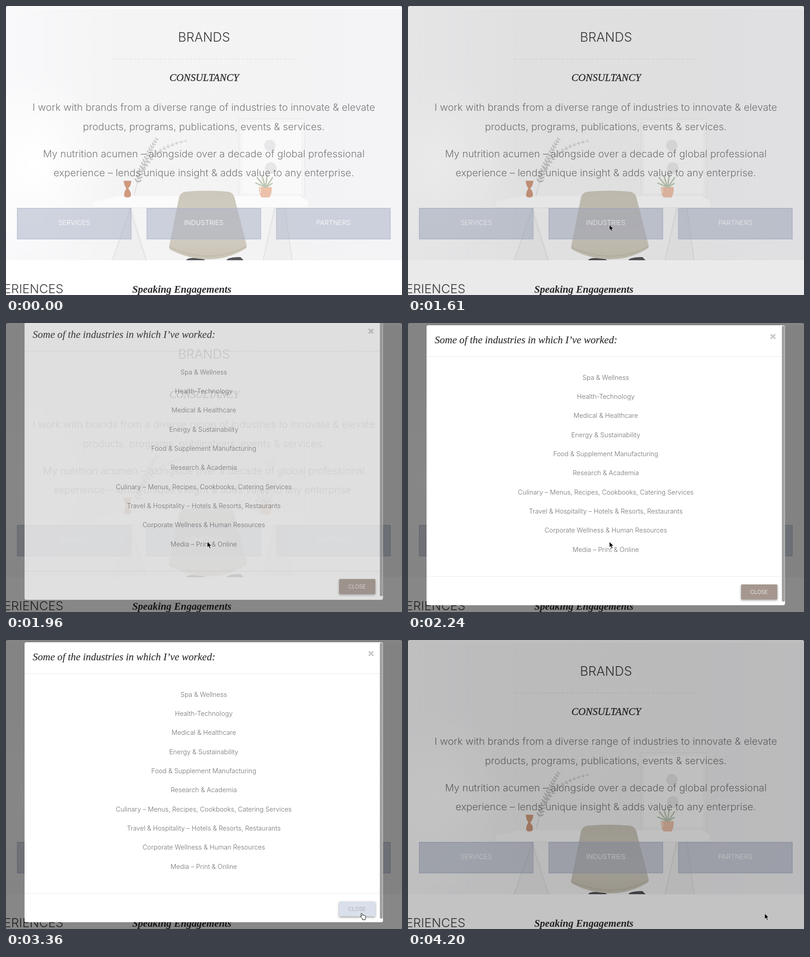
An HTML page for the animation above (4.27 s loop, 875 by 640 pixels).

```html
<!DOCTYPE html>
<html lang="en">
<head>
<meta charset="utf-8">
<title>Brands</title>
<style>
  html, body { margin: 0; width: 100%; height: 100%; overflow: hidden; background: #fff; }
  svg { display: block; width: 875px; height: 640px; }
  text { font: 300 22px Inter, "Open Sans", sans-serif; fill: #7a7a7c; }
  .mid { text-anchor: middle; }
  .heading { font-size: 28.3px; fill: #3c3c3e; }
  .serif { font: italic 22.6px "Liberation Serif", serif; fill: #2c2c2e; stroke: #2c2c2e; stroke-width: .35; }
  .strong { font-weight: bold; stroke: none; }
  .label { font-size: 14.8px; fill: #fff; }
  .item { font-size: 14.4px; fill: #737375; }
  .tab { fill: #a5adc4; fill-opacity: .5; stroke: #a9b3cb; stroke-opacity: .55; stroke-width: 2; }
  #closeButton { filter: drop-shadow(0 2px 2.5px rgba(0, 0, 0, .4)); }
  #closeLabel { font-size: 12px; }
</style>
</head>
<body>
<svg viewBox="0 0 875 640">
  <defs>
    <linearGradient id="wall">
      <stop offset="0" stop-color="#f9f9fb"/><stop offset=".3" stop-color="#f4f4f5"/>
      <stop offset=".7" stop-color="#f3f3f4"/><stop offset="1" stop-color="#f4f4f7"/>
    </linearGradient>
    <radialGradient id="glow"><stop offset="0" stop-color="#fff"/><stop offset="1" stop-color="#fff" stop-opacity="0"/></radialGradient>
    <linearGradient id="seat" x2="0" y2="1">
      <stop offset="0" stop-color="#cdc8bb"/><stop offset=".6" stop-color="#d3cec4"/><stop offset="1" stop-color="#c9c4b4"/>
    </linearGradient>
  </defs>

  <rect width="875" height="640" fill="#fff"/>
  <rect width="875" height="7" fill="#fafafb"/>
  <rect y="7" width="875" height="556" fill="url(#wall)"/>
  <ellipse cx="60" cy="350" rx="170" ry="210" fill="url(#glow)"/>

  <g id="room">
    <g fill="#f6f6f7" stroke="#ececee" stroke-width="2">
      <path d="M515 250H660V422H515Z"/><path d="M520 256H654V417H520Z" fill="#f9f9fa" stroke-width="1"/>
    </g>
    <g fill="#e7e7e9"><circle cx="583" cy="309" r="12.5"/><circle cx="585" cy="359" r="13"/></g>
    <path d="M278 447L235 563H312ZM592 447L567 563H632L618 447Z" fill="#efeff0"/>
    <path d="M195 433L250 421H650L668 433V446H195Z" fill="#fbfbfc"/>
    <path d="M195 447H668" stroke="#e9e9eb"/>
    <path d="M276 447L235 563M272 447L310 563M594 447L568 563M616 447L632 563" stroke="#e4e4e6" stroke-width="2.5"/>
    <path d="M283 419Q300 345 332 296M290 390Q315 315 396 299" fill="none" stroke="#cacac8"/>
    <g id="leaves" fill="#c2c3c0"/>
    <path d="M260 387H277Q276 399 270 404Q277 412 276 420Q275 424 268 424Q261 424 261 419Q261 411 266 404Q261 398 260 387Z" fill="#cf9a7e"/>
    <path d="M559 401H587Q588 416 582 424H565Q558 416 559 401Z" fill="#ecc1aa"/>
    <path d="M562 403V414" stroke="#f8dfd1" stroke-width="3"/>
    <path d="M572 401L555 380M573 401L566 377M574 401L577 374M575 401L589 380M572 401L552 392M575 401L588 393" stroke="#bdc8b3" stroke-width="3" stroke-linecap="round"/>
    <path d="M398 563Q402 555 436 560L440 563ZM487 563Q490 556 518 556L525 563Z" fill="#55555a"/>
    <path d="M399 411Q445 407 488 411Q502 412 505 425L531 527Q534 535 528 538Q490 561 446 561Q402 560 364 540Q359 538 361 530L382 425Q385 412 399 411Z" fill="url(#seat)"/>
    <path d="M361 534Q402 553 446 554Q490 554 530 533" fill="none" stroke="#b9b3a3" stroke-width="2" opacity=".6"/>
  </g>

  <path d="M235 117.5H638" stroke="#d9d9da" stroke-dasharray="5 4.5"/>
  <g class="mid">
    <text class="heading" x="437.5" y="79">BRANDS</text>
    <text class="serif" x="438" y="166">CONSULTANCY</text>
    <text x="437" y="232">I work with brands from a diverse range of industries to innovate &amp; elevate</text>
    <text x="437" y="274.5">products, programs, publications, events &amp; services.</text>
    <text x="437" y="334.5">My nutrition acumen – alongside over a decade of global professional</text>
    <text x="437" y="377">experience – lends unique insight &amp; adds value to any enterprise.</text>
    <g id="tabs"></g>
  </g>
  <text class="heading" x="127" y="636" text-anchor="end" style="font-size:27.5px">EXPERIENCES</text>
  <text class="serif strong" x="279" y="635">Speaking Engagements</text>

  <rect id="backdrop" width="875" height="640"/>
  <rect id="veil" x="41" y="5" width="792" height="620" fill="#878787"/>

  <g id="modal">
    <rect x="41" y="5" width="792" height="620" rx="4" fill="#fff"/>
    <path d="M41 74.5H826M41 561.5H826" stroke="#ebebec"/>
    <text class="serif" x="59" y="45" style="stroke-width:.15">Some of the industries in which I’ve worked:</text>
    <path d="M801.5 25L811.5 35M811.5 25L801.5 35" stroke="#cbcbcb" stroke-width="3.6"/>
    <g id="items" class="mid"></g>
    <rect id="closeButton" x="736" y="579" width="80" height="33" rx="1.5"/>
    <text id="closeLabel" class="mid" x="775.5" y="600">CLOSE</text>
    <rect id="scrollbar" x="826" y="6" width="6.5" height="611" rx="3" fill="#a2a2a2"/>
  </g>

  <circle id="halo" fill="#000" opacity=".05"/>
  <g id="cursor">
    <path id="arrow" d="M0 0V12.6L3 10L5.2 14.8L7.4 13.8L5.2 9.2H9.3Z" fill="#000" stroke="#fff" stroke-width=".8"/>
    <path id="hand" d="M-2 0Q-3.800-.5-3.600 1.300L-1.600 6.200L-3.800 5Q-5.500 5.200-4.600 6.800L-.5 11.500V14H5.800V11.500Q7.500 9 6.300 5.500Q5.500 3.900 4 4.600Q3 3.200 1.800 4Q.8 3 .1 3.900L-1 .8Q-1.400 0-2 0Z" fill="#fff" stroke="#111" stroke-width="1"/>
  </g>
  <path d="M0 0H4Q0 0 0 4ZM875 0H871Q875 0 875 4Z" fill="#333"/>
</svg>

<script>
const LOOP = 4270, STEP = 70;
const BACKDROP = 0.47, SLIDE = 155;
const $ = id => document.getElementById(id);
const clamp = v => Math.max(0, Math.min(1, v));
const progress = (t, start, length) => clamp((t - start) / length);
const set = (id, attrs) => {
  for (const name in attrs) $(id).setAttribute(name, attrs[name]);
};

const industries = [
  "Spa & Wellness", "Health-Technology", "Medical & Healthcare", "Energy & Sustainability",
  "Food & Supplement Manufacturing", "Research & Academia",
  "Culinary – Menus, Recipes, Cookbooks, Catering Services",
  "Travel & Hospitality – Hotels & Resorts, Restaurants",
  "Corporate Wellness & Human Resources", "Media – Print & Online"
];
$("items").innerHTML = industries.map((name, i) =>
  `<text class="item" x="437" y="${125.6 + i * 42.33}">${name.replace("&", "&amp;")}</text>`).join("");

$("tabs").innerHTML = ["SERVICES", "INDUSTRIES", "PARTNERS"].map((name, i) => {
  const x = 25 + i * 286.3;
  return `<rect class="tab" x="${x}" y="448" width="251.5" height="68"/>
    <text class="label" x="${x + 125.7}" y="485">${name}</text>`;
}).join("");

// Leaf pairs along a quadratic stem
function leaves(a, b, c, count, size) {
  let out = "";
  for (let i = 0; i < count; i++) {
    const u = 0.2 + 0.8 * i / (count - 1), v = 1 - u;
    const at = k => v * v * a[k] + 2 * u * v * b[k] + u * u * c[k];
    const slope = k => v * (b[k] - a[k]) + u * (c[k] - b[k]);
    const angle = Math.atan2(slope(1), slope(0)) * 180 / Math.PI;
    const r = size * (1.2 - 0.6 * u);
    for (const side of [-1, 1])
      out += `<ellipse cx="${r}" rx="${r}" ry="${r * 0.36}" transform="translate(${at(0)} ${at(1)}) rotate(${angle + side * 48})"/>`;
  }
  return out;
}
$("leaves").innerHTML =
  leaves([283, 419], [300, 345], [332, 296], 15, 4.8) +
  leaves([290, 390], [315, 315], [396, 299], 13, 3.4);

// time, x, y
const route = [
  [70, 683, 615], [210, 525, 530], [350, 446, 491], [490, 445, 484.5], [2380, 445, 484.5],
  [2590, 427, 580], [2730, 545, 618], [2870, 760, 612], [2940, 788, 605.5], [LOOP, 788, 605.5]
];
function pointerAt(t) {
  const i = Math.max(1, route.findIndex(point => point[0] >= t));
  const [t0, x0, y0] = route[i - 1], [t1, x1, y1] = route[i];
  const u = progress(t, t0, t1 - t0);
  return [x0 + (x1 - x0) * u, y0 + (y1 - y0) * u];
}

function haloRadius(t) {
  if (t >= 700 && t < 1330) return t < 770 ? 14 : 20.5;
  if (t >= 1330 && t < 1470) return 28.5;
  if (t >= 3430 && t < 3640) return t < 3500 ? 20.5 : 28.5;
  return 0;
}

function snap(t) {
  const step = t >= 1820 && t < 2100 ? 2 * STEP : STEP;
  return Math.floor(t / step) * step;
}

function draw(time) {
  const t = snap(time);
  const dim = Math.pow(progress(t, 1400, 420), 2.5) * (1 - 0.5 * progress(t, 3990, 140));
  set("backdrop", { opacity: BACKDROP * dim });

  const remaining = 1 - progress(t, 1750, 350);
  const leave = progress(t, 3570, 420);
  const opacity = (1 - Math.pow(remaining, 1.5)) * (1 - Math.pow(leave, 1.9));
  const offset = -SLIDE * (Math.pow(remaining, 2.8) + Math.pow(leave, 1.5));
  const move = `translate(0 ${offset})`;
  set("modal", { opacity, transform: move });
  set("veil", { opacity: leave > 0 ? Math.min(1, 1.4 * opacity) : 0, transform: move });
  set("scrollbar", { opacity: 1 - progress(t, 3360, 140) });

  const hover = t >= 2870;
  $("closeButton").style.fill = leave > 0 ? "#fcfcfc" : hover ? "#d9e0eb" : "#a5978f";
  $("closeLabel").style.fill = leave > 0 ? "#858585" : hover ? "#a3a1a0" : "#fff";

  const [x, y] = pointerAt(t);
  const hand = hover && t < 4200;
  set("cursor", { transform: `translate(${x} ${y})`, opacity: t < 70 ? 0 : 1 });
  set("arrow", { opacity: hand ? 0 : 1 });
  set("hand", { opacity: hand ? 1 : 0 });
  set("halo", { cx: x, cy: y, r: haloRadius(t) });
}

const began = performance.now();
function tick() {
  draw((performance.now() - began) % LOOP);
  requestAnimationFrame(tick);
}
tick();
</script>
</body>
</html>
```
